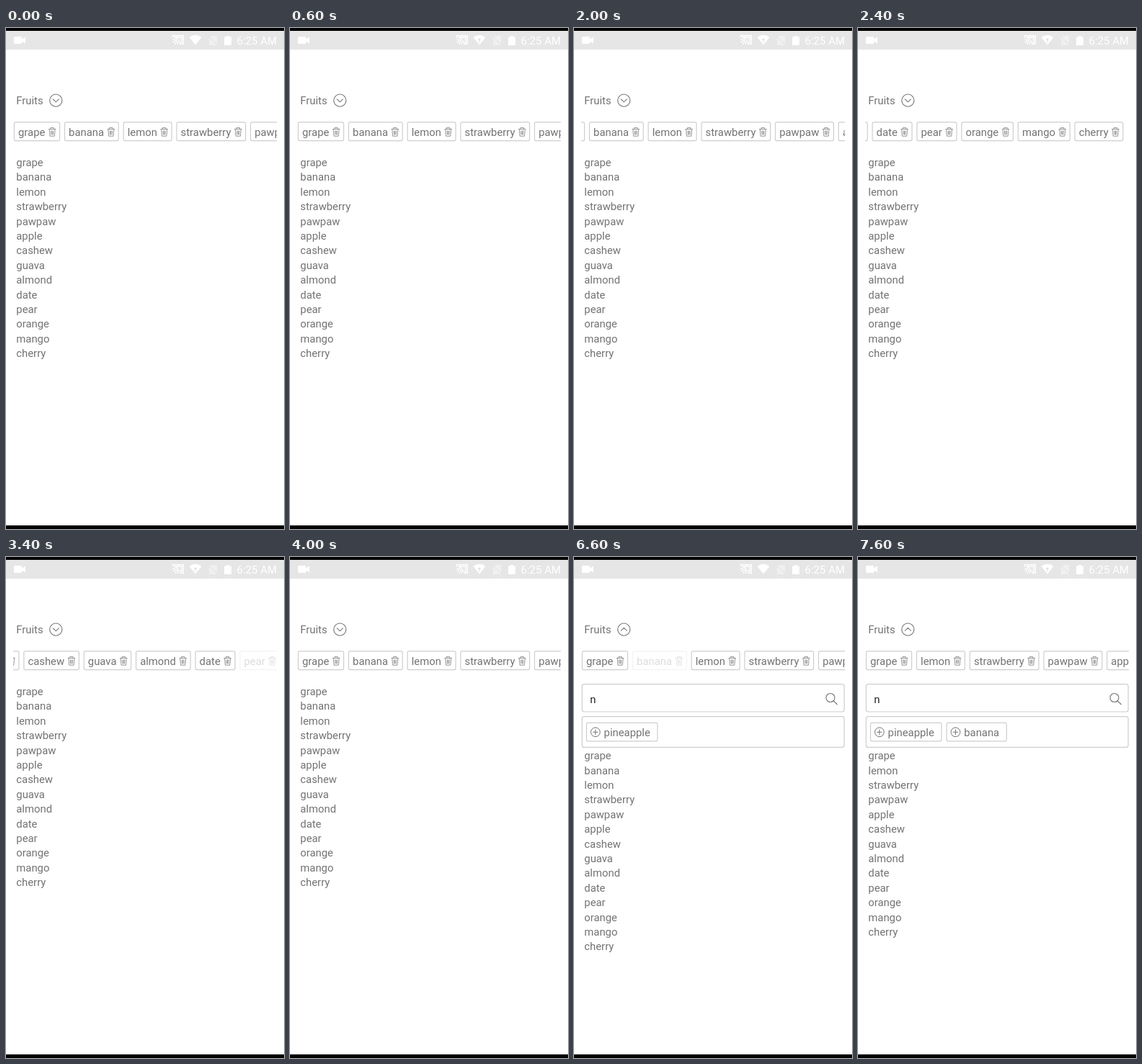
Recreate the animation shown at these times as an HTML page with a canvas. Size 386 by 696 pixels, loop 8 s.

```html
<!DOCTYPE html>
<html lang="en">
<head>
<meta charset="utf-8">
<title>Fruit tags</title>
<style>
  html, body { margin: 0; width: 386px; height: 696px; overflow: hidden; background: #fff }
  canvas { display: block; width: 386px; height: 696px }
</style>
</head>
<body>
<canvas id="stage"></canvas>
<script>
const canvas = document.getElementById('stage');
const ctx = canvas.getContext('2d');
const ratio = window.devicePixelRatio || 1;
canvas.width = 386 * ratio;
canvas.height = 696 * ratio;

const LOOP = 8000, STEP = 100;
const OPEN = 4500, PRESS = 6600, REMOVE = 7600;
const GREY = '#737373', ICON = '#8c8c8c', BORDER = '#cecece', BAR = '#e6e6e6';
const FONT = '14.85px Roboto, sans-serif';
const FRUITS = ['grape', 'banana', 'lemon', 'strawberry', 'pawpaw', 'apple', 'cashew',
  'guava', 'almond', 'date', 'pear', 'orange', 'mango', 'cherry'];

// [time, scroll offset of the tag row]
const SCROLL = [[0, 0], [200, 0], [400, 36], [600, 0], [1100, 0], [1300, -11], [1400, -6],
  [1600, 0], [1900, 0], [2000, 60], [2100, 300], [2200, 560], [2300, 690], [2400, 714.5],
  [3100, 714.5], [3200, 690], [3300, 600], [3400, 471.5], [3500, 280], [3600, 120],
  [3700, 30], [3800, 0], [LOOP, 0]];

const TRASH = new Path2D('M0 2.5H10.4M3 2.5V.5H7.4V2.5M1.2 2.5L2 12.2H8.4L9.2 2.5M3.6 4.5L3.9 10.3M5.2 4.5V10.3M6.8 4.5L6.5 10.3');
const SEARCH = new Path2D('M362 195.5a6 6 0 1 1-12 0a6 6 0 1 1 12 0M360.4 199.8L365.6 205');
const CAMERA = new Path2D('M12 12H21Q22 12 22 13V15.5L27 12.5V21.5L22 18.5V21Q22 22 21 22H12Q11 22 11 21V13Q11 12 12 12Z');
const CAST = new Path2D('M231.7 13.5V10.8H246.3V22.2H241M231.5 16a7 7 0 0 1 7 7M231.5 19a4 4 0 0 1 4 4M234 13.3H244V19.8H240.5Q239 15 234 13.3');
const WIFI = new Path2D('M254.5 13Q263 6.5 271.5 13L263 23.5Z');
const SIM = new Path2D('M285 11H293V24H282V14Z');
const BATTERY = new Path2D('M303 12.5H306V11H310V12.5H313V24H303Z');

function scrollAt(t) {
  const i = SCROLL.findIndex(key => key[0] > t);
  const [t0, a] = SCROLL[i - 1], [t1, b] = SCROLL[i];
  return a + (b - a) * (t - t0) / (t1 - t0);
}

function rect(x, y, w, h, color) {
  ctx.fillStyle = color;
  ctx.fillRect(x, y, w, h);
}

function text(str, x, y, color = GREY, font = FONT) {
  ctx.font = font;
  ctx.fillStyle = color;
  ctx.fillText(str, x, y);
}

function stroke(path, color, width = 1) {
  ctx.strokeStyle = color;
  ctx.lineWidth = width;
  ctx.stroke(path);
}

function fill(path, color) {
  ctx.fillStyle = color;
  ctx.fill(path);
}

function box(x, y, w, h, radius = 2) {
  const path = new Path2D();
  path.roundRect(x + .6, y + .6, w - 1.2, h - 1.2, radius);
  stroke(path, BORDER, 1.2);
}

function textWidth(str) {
  ctx.font = FONT;
  return ctx.measureText(str).width;
}

function statusBar(t) {
  rect(0, 0, 386, 4, '#000');
  rect(0, 4, 386, 26, BAR);
  rect(0, 691, 386, 5, '#000');
  for (const icon of [CAMERA, WIFI, BATTERY]) fill(icon, '#fff');
  stroke(CAST, '#fff', 1.4);
  fill(SIM, '#f0f0f0');
  stroke(new Path2D('M281 11L294 24'), BAR, 1.5);
  if (t >= 600 && t < 5400 || t >= 7300) text('?', 260.7, 20, '#d2d2d2', 'bold 8px Roboto, sans-serif');
  text('6:25 AM', 320.5, 23, '#fff', '15px Roboto, sans-serif');
}

function header(open) {
  text('Fruits', 14.2, 106);
  const dir = open ? -1 : 1;
  const path = new Path2D();
  path.arc(69.3, 100.6, 8.6, 0, 7);
  path.moveTo(65, 100.6 - 2 * dir);
  path.lineTo(69.3, 100.6 + 2.2 * dir);
  path.lineTo(73.6, 100.6 - 2 * dir);
  stroke(path, GREY, 1.1);
}

function tagRow(items, t) {
  ctx.save();
  ctx.beginPath();
  ctx.rect(10, 125, 366, 40);
  ctx.clip();
  let x = 10.8 - scrollAt(t);
  for (const name of items) {
    const w = textWidth(name);
    const pressed = name === 'banana' && t >= PRESS || name === 'pear' && t >= 3200 && t < 3600;
    ctx.globalAlpha = pressed ? .25 : 1;
    box(x, 130.2, w + 27, 27);
    text(name, x + 6.2, 150);
    ctx.save();
    ctx.translate(x + w + 10.8, 138);
    stroke(TRASH, ICON, .9);
    ctx.restore();
    x += w + 32.7;
  }
  ctx.restore();
}

function picker(options) {
  box(10.6, 176, 365.2, 39.6, 3);
  text('n', 22.2, 203.3, '#222');
  stroke(SEARCH, GREY, 1.1);
  box(10.6, 221, 365.2, 44, 3);
  let x = 16.8;
  for (const name of options) {
    const w = textWidth(name), cx = x + 13;
    box(x, 229.8, w + 35.5, 26.6);
    const plus = new Path2D(`M${cx - 3.7} 243.3h7.4M${cx} 239.6v7.4`);
    plus.moveTo(cx + 6.4, 243.3);
    plus.arc(cx, 243.3, 6.4, 0, 7);
    stroke(plus, GREY);
    text(name, x + 24.8, 249);
    x += w + 41.4;
  }
}

function draw(t) {
  const open = t >= OPEN, removed = t >= REMOVE;
  const items = removed ? FRUITS.filter(name => name !== 'banana') : FRUITS;
  ctx.setTransform(ratio, 0, 0, ratio, 0, 0);
  rect(0, 0, 386, 696, '#fff');
  statusBar(t);
  header(open);
  tagRow(items, t);
  if (open) picker(removed ? ['pineapple', 'banana'] : ['pineapple']);
  items.forEach((name, i) => text(name, 14.3, (open ? 281.1 : 192) + i * 20.4));
}

const start = performance.now();
function tick() {
  const t = (performance.now() - start) % LOOP;
  draw(Math.floor(t / STEP) * STEP);
  requestAnimationFrame(tick);
}
tick();
</script>
</body>
</html>
```
